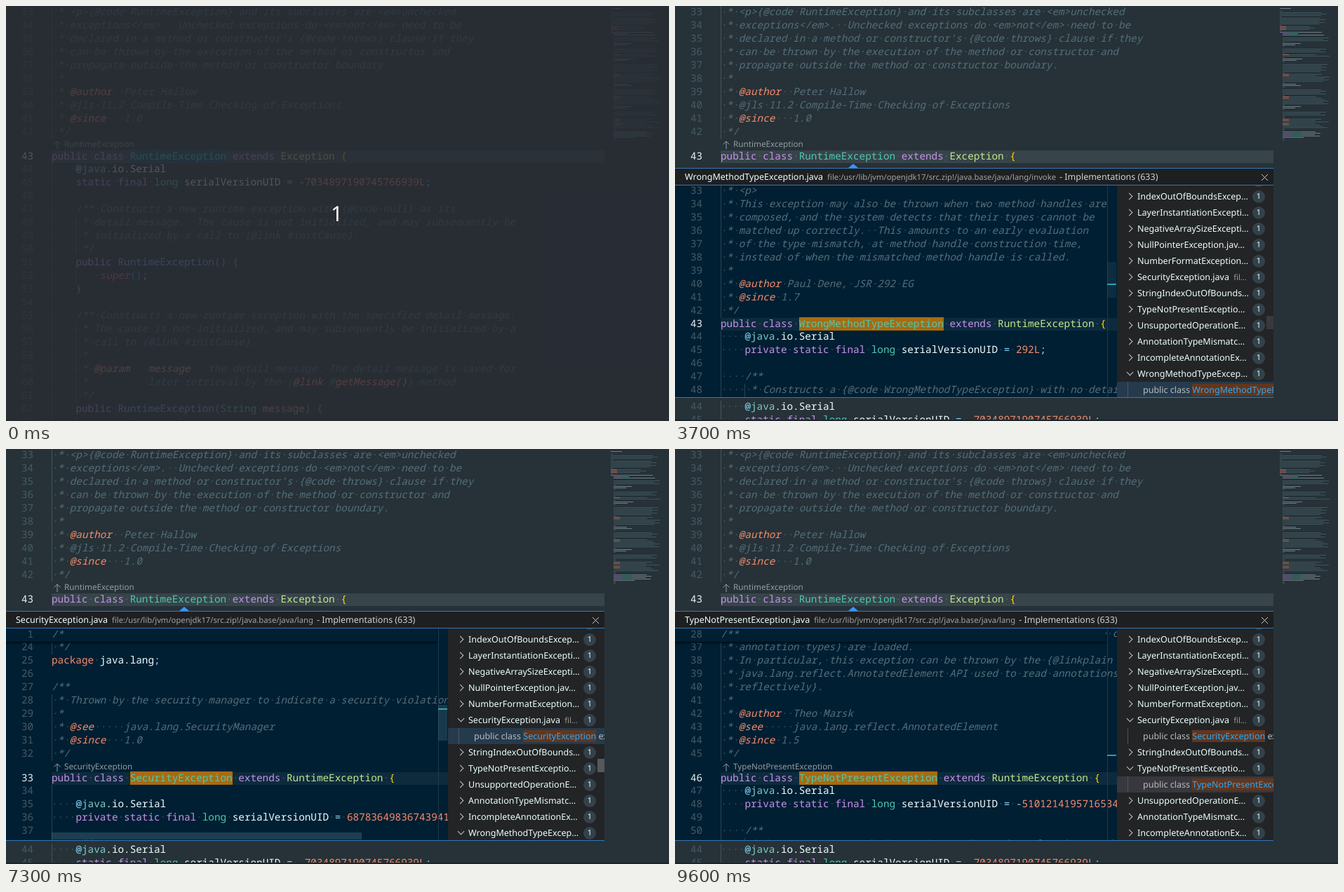
Write an HTML page that moves like this. It is 945 px wide and 592 px high and loops after 9.7 s.

```html
<!DOCTYPE html>
<html lang="en">
<head>
<meta charset="utf-8">
<title>Peek implementations</title>
<style>
html, body { margin: 0; width: 100%; height: 100%; overflow: hidden; background: #263238; }
div, svg { position: absolute; top: 0; left: 0; }
div { white-space: pre; box-sizing: border-box; }
b { font-weight: normal; }
s { text-decoration: none; color: rgba(130, 160, 170, .36); }
#stage { width: 945px; height: 592px; overflow: hidden; background: #263238; color: #eeffff;
  font: 12.5px/23px "Noto Sans", sans-serif; text-rendering: geometricPrecision; }
#main { width: 853px; height: 592px; overflow: hidden; }
#tail { width: 100%; }
.row { width: 100%; height: 18.95px; font: 14.32px/18.95px "Noto Sans Mono", monospace; }
.no { width: 39.2px; text-align: right; color: #465a64; }
.code { left: 65px; }
.on .no { color: #e8f0f0; }
.on::before { content: ""; position: absolute; left: 65px; right: 0; height: 100%; background: #37444a; }
.guide { width: 1px; height: 19px; background: rgba(190, 200, 170, .22); }
.lens { left: 83px; font-size: 11.7px; line-height: 16px; color: #929da1; }
.lens svg { left: -16px; top: 2px; }
em { color: #546e7a; }
.k { color: #c792ea; } .t, .c { color: #4ec9b0; } .i { color: #c3e88d; } .f { color: #82aaff; }
.r { color: #ff5370; font-style: italic; } .n { color: #f78c6c; } .y { color: #89ddff; } .j { color: #80cbc4; }
.d0 .p { color: #ffd700; } .d1 .p { color: #da70d6; } .d2 .p { color: #179fff; }
.hi .c { background: #124c61; }
#caret { left: 253px; top: 206px; width: 2px; height: 18px; background: #3bc9db; }
#mini div { height: 1px; }
#menu { left: 255px; top: 206px; width: 314px; height: 377px; padding: 5px 0; background: #252526; color: #ccc; }
#menu div { position: relative; height: 25px; line-height: 25px; padding: 0 26px; }
#menu div.hot { background: #253a4d; color: #fff; }
#menu span { position: absolute; right: 26px; }
#menu hr { margin: 4px 10px 3.5px; border: 0; border-top: 1px solid #454545; }
#title { top: 231px; width: 853px; height: 25px; padding-left: 14px; line-height: 24px; background: #1e1f21;
  border: solid #3478b8; border-width: 1px 0; }
#title small { font-size: 11.25px; color: #a0a4a8; margin: 0 5px 0 6px; }
#title span { color: #d0d3d5; }
#arrow { left: 247px; top: 225px; border: 7px solid transparent; border-top: 0; border-bottom: 6px solid #3794ff; }
#close { left: 835px; top: 239px; }
#body { top: 256px; width: 630px; height: 302px; overflow: hidden; background: #001f33; }
#body .on::before { background: #0d2b3d; }
#body .c { background: #a66c12; }
#body.raw .code, #body.raw em, #body.raw b { color: #c3cdd2; font-style: normal; }
#body.raw .d0 .p { color: #ffd700; }
#sticky { width: 614px; height: 19px; background: #001f33; box-shadow: 0 2px 3px #000a; }
#ruler { left: 616px; width: 13px; height: 302px; border-left: 1px solid #1b3a4b; }
#tick { left: 616px; width: 13px; height: 2px; background: #25a0b4; }
#vbar { left: 616px; top: 109px; width: 13px; height: 51px; background: rgba(120, 160, 170, .2); }
#hbar { left: 65px; top: 291px; width: 442px; height: 10px; background: rgba(120, 160, 170, .25); }
#list { left: 630px; top: 256px; width: 223px; height: 302px; overflow: hidden; background: #222426; }
.item { width: 100%; height: 23px; padding-left: 29px; }
.item small { font-size: 11.25px; color: #999; }
.item::before { content: ""; position: absolute; left: 14px; top: 8px; width: 6px; height: 6px;
  border: solid #c5c5c5; border-width: 1px 1px 0 0; transform: rotate(45deg); }
.open::before { top: 6px; left: 15px; transform: rotate(135deg); }
.item i { position: absolute; left: 193px; top: 3px; width: 18px; height: 18px; border-radius: 9px;
  background: #33424a; font: 11px/18px "Noto Sans", sans-serif; text-align: center; }
.child { padding-left: 37px; color: #b9bcbe; }
.child::before { left: 15px; top: 0; width: 0; height: 23px; transform: none; border-width: 0 0 0 1px; border-color: #555; }
mark { background: #62361d; color: #2aaaff; }
.sel { background: #253a4d; }
.idle .sel { background: #37373d; }
#lbar { left: 843px; top: 442px; width: 10px; height: 19px; background: rgba(121, 125, 128, .6); }
#edge { top: 558px; width: 853px; height: 1px; background: #3478b8; }
#foot { top: 590px; width: 945px; height: 2px; background: #1c2529; }
#dim { width: 945px; height: 592px; background: rgba(40, 44, 52, .8); }
#dim div { width: 943px; top: 276px; text-align: center; font: 30px/40px "Noto Sans", sans-serif; color: #fff; }
</style>
</head>
<body>
<div id="stage">
  <div id="main"></div>
  <div id="caret"></div>
  <div id="mini"></div>
  <div id="menu"></div>
  <div id="peek">
    <div id="arrow"></div>
    <div id="title"></div>
    <svg id="close" width="11" height="11" stroke="#ccc"><path d="M1 1 10 10M10 1 1 10"/></svg>
    <div id="body"></div>
    <div id="list"></div>
    <div id="lbar"></div>
    <div id="edge"></div>
  </div>
  <div id="foot"></div>
  <div id="dim"><div>1</div></div>
</div>
<script>
const $ = id => document.getElementById(id);
const LOOP = 9700, PITCH = 18.95, LENS = 16;

const MAIN = ` * <p>{@code RuntimeException} and its subclasses are <em>unchecked
 * exceptions</em>.  Unchecked exceptions do <em>not</em> need to be
 * declared in a method or constructor's {@code throws} clause if they
 * can be thrown by the execution of the method or constructor and
 * propagate outside the method or constructor boundary.
 *
 * @author  Peter Hallow
 * @jls 11.2 Compile-Time Checking of Exceptions
 * @since   1.0
 */
public class RuntimeException extends Exception {
    @java.io.Serial
    static final long serialVersionUID = -7034897190745766939L;

    /** Constructs a new runtime exception with {@code null} as its
     * detail message.  The cause is not initialized, and may subsequently be
     * initialized by a call to {@link #initCause}.
     */
    public RuntimeException() {
        super();
    }

    /** Constructs a new runtime exception with the specified detail message.
     * The cause is not initialized, and may subsequently be initialized by a
     * call to {@link #initCause}.
     *
     * @param   message   the detail message. The detail message is saved for
     *          later retrieval by the {@link #getMessage()} method.
     */
    public RuntimeException(String message) {
        super(message);`.split('\n');

const FILES = [
  { name: 'WrongMethodTypeException', dir: '/invoke', start: 3700, first: 33, decl: 43, tick: 397, text: ` * <p>
 * This exception may also be thrown when two method handles are
 * composed, and the system detects that their types cannot be
 * matched up correctly.  This amounts to an early evaluation
 * of the type mismatch, at method handle construction time,
 * instead of when the mismatched method handle is called.
 *
 * @author Paul Dene, JSR 292 EG
 * @since 1.7
 */
public class WrongMethodTypeException extends RuntimeException {
    @java.io.Serial
    private static final long serialVersionUID = 292L;

    /**
     * Constructs a {@code WrongMethodTypeException} with no detail` },
  { name: 'SecurityException', dir: '', start: 6500, first: 23, decl: 33, tick: 369, text: ` *
 */
package java.lang;

/**
 * Thrown by the security manager to indicate a security violation.
 *
 * @see     java.lang.SecurityManager
 * @since   1.0
 */
public class SecurityException extends RuntimeException {

    @java.io.Serial
    private static final long serialVersionUID = 6878364983674394167L;

    /**` },
  { name: 'TypeNotPresentException', dir: '', start: 8400, first: 36, decl: 46, tick: 435, text:
` * <p>Note that this exception may be thrown when some types are c
 * annotation types) are loaded.
 * In particular, this exception can be thrown by the {@linkplain
 * java.lang.reflect.AnnotatedElement API used to read annotations
 * reflectively}.
 *
 * @author  Theo Marsk
 * @see     java.lang.reflect.AnnotatedElement
 * @since 1.5
 */
public class TypeNotPresentException extends RuntimeException {
    @java.io.Serial
    private static final long serialVersionUID = -5101214195716534496L;

    /**
     * Constructs a {@code TypeNotPresentException} for the named type` }
];

// Syntax colouring: each named group is the class of its token.
const CODE = /(?<k>\b(?:public|class|static|final|private|extends)\b)|(?<t>\b(?:long|String)\b)|(?<c>(?<=class )\w+)|(?<i>(?<=extends )\w+)|(?<r>\bsuper\b)|(?<f>\w+(?=\())|(?<n>\b(?:\d+L|package|message)\b)|(?<j>(?<=@)java)|(?<y>[@;=-])|(?<p>[(){}])/g;
const DOC = /(?<n>@(?:author|since|see)\b|@param +message|@link(?= #get)|getMessage\(\))/g;

const plain = s => s.replace(/[&<>]/g, c => `&#${c.charCodeAt()};`).replace(/ /g, '<s>·</s>');

function mark(text, pattern) {
  let out = '', at = 0;
  for (const m of text.matchAll(pattern)) {
    const kind = Object.keys(m.groups).find(k => m.groups[k] !== undefined);
    out += plain(text.slice(at, m.index)) + `<b class="${kind}">${plain(m[0])}</b>`;
    at = m.index + m[0].length;
  }
  return out + plain(text.slice(at));
}

const paint = src => /^\s*(\/\*|\*)/.test(src) ? `<em>${mark(src, DOC)}</em>` : mark(src, CODE);

function row(no, src, top, decl) {
  const lead = src.search(/\S|$/);
  const guides = [65, 99].slice(0, lead > 4 ? 2 : lead || (!src && no > decl) ? 1 : 0);
  return `<div class="row d${lead >> 2} ${no === decl ? 'on' : ''}" style="top:${top}px">` +
    guides.map(x => `<div class="guide" style="left:${x}px"></div>`).join('') +
    `<div class="no">${no}</div><div class="code">${paint(src)}</div></div>`;
}

const lens = (name, top) => `<div class="lens" style="top:${top}px"><svg width="12" height="13" fill="none"
  stroke="#929da1"><path d="M6 13V2M1.5 6.5 6 2l4.5 4.5"/></svg>${name}</div>`;

function buildMain() {
  const rows = MAIN.map((src, i) => row(33 + i, src, i * PITCH + (i > 9 ? LENS : 0), 43));
  $('main').innerHTML = rows.slice(0, 11).join('') + lens('RuntimeException', 189) +
    `<div id="tail">${rows.slice(11).join('')}</div>`;
}

// One letter per line: s short, c comment, o doc tag, k/K code.
function buildMini() {
  const kinds = 'k scccscccccsooosKkK cccskks cccsocskks ccccccsooccccskks ccccsooccccskks cccssoocooccssKKKKkss';
  const size = { s: 3, c: 54, o: 42, k: 16, K: 46 };
  $('mini').innerHTML = [...kinds].map((kind, i) => {
    if (kind === ' ') return '';
    const width = size[kind] + (kind === 's' ? 0 : i * 37 % 15);
    const ink = /[kK]/.test(kind) ? '#9aa9b5a0' : '#546e7a90';
    const head = kind === 'o' ? '#f78c6ca0 0 9px,' : kind === 'K' ? '#c792ea90 0 12px,#4ec9b090 12px 26px,' : '';
    return `<div style="left:${862 + (i > 17 ? 4 : 0)}px;top:${3 + 2 * i}px;width:${width}px;` +
      `background:linear-gradient(90deg,${head}${ink} 0 100%)"></div>`;
  }).join('');
}

const MENU = ['Go to Definition|F12', 'Go to Type Definition', 'Go to Implementations|Ctrl+F12',
  'Go to References|Shift+F12', 'Peek|›', '', 'Find All References|Shift+Alt+F12', 'Find All Implementations',
  'Show Call Hierarchy|Shift+Alt+H', 'Show Type Hierarchy', '', 'Rename Symbol|F2',
  'Change All Occurrences|Ctrl+F2', 'Format Document|Ctrl+Shift+I', 'Refactor...|Ctrl+Shift+R', 'Source Action...'];

function buildMenu(hot) {
  $('menu').innerHTML = MENU.map((item, i) => {
    const [label, key = ''] = item.split('|');
    return item ? `<div class="${i === hot ? 'hot' : ''}">${label}<span>${key}</span></div>` : '<hr>';
  }).join('');
}

function buildBody(file, age, sticky) {
  const shown = age >= 300;
  const y = i => i * PITCH - 1;
  $('body').className = file.start > 3700 && age < 100 ? 'raw' : '';
  $('body').innerHTML = file.text.split('\n').map((src, i) =>
    row(file.first + i, src, y(i) + (shown && i > 9 ? LENS : 0), file.decl)).join('') +
    (shown ? lens(file.name, y(10)) : '') +
    (sticky ? `<div id="sticky">${row(sticky, sticky === 1 ? '/*' : '/**', -.5)}</div>` : '') +
    `<div id="ruler"></div><div id="tick" style="top:${file.tick - 257 + (shown ? 1.5 : 0)}px"></div>
    <div id="vbar"></div><div id="hbar"></div>`;
  $('title').innerHTML = `${file.name}.java<small>file:/usr/lib/jvm/openjdk17/src.zip!/java.base/java/lang${file.dir}</small>` +
    '<span>- Implementations (633)</span>';
}

const ITEMS = ['IllegalThreadStateExc…', 'IndexOutOfBoundsExcep…', 'LayerInstantiationExcepti…', 'NegativeArraySizeExcepti…',
  'NullPointerException.jav…', 'NumberFormatException…', 'SecurityException.java <small> fil…</small>',
  'StringIndexOutOfBounds…', 'TypeNotPresentExceptio…', 'UnsupportedOperationE…', 'AnnotationTypeMismatc…',
  'IncompleteAnnotationEx…', 'WrongMethodTypeExcep…'];

function buildList(open, selected) {
  const rows = [];
  const add = (key, cls, html) => rows.push(`<div class="item ${cls} ${key === selected ? 'sel' : ''}"
    style="top:${rows.length * 23 - 19}px">${html}</div>`);
  ITEMS.forEach(label => {
    const file = open.find(f => label.startsWith(f.name.slice(0, 12)));
    const key = label.slice(0, 4);
    add(key, file ? 'open' : '', `${label}<i>1</i>`);
    if (file) add(key + '+', 'child', `public class <mark>${file.name}</mark> extends RuntimeException`);
  });
  $('list').innerHTML = rows.join('');
}

// Last value whose start time has been reached.
const at = (t, ...steps) => steps.filter(([from]) => t >= from).pop()[1];
const fade = (t, from) => t < from ? 0 : Math.max(0, 1 - (t - from) / 800);
const show = (id, on) => $(id).style.display = on ? '' : 'none';

const drawn = {};
function update(build, ...args) {
  const key = JSON.stringify(args);
  if (drawn[build.name] !== key) build(...args);
  drawn[build.name] = key;
}

function frame() {
  const t = Math.floor(performance.now() % LOOP / 100) * 100;
  const peek = t >= 3700, menu = t >= 800 && t < 1900;
  show('dim', t < 100);
  show('menu', menu);
  show('caret', t >= 100 && !peek && !menu);
  show('peek', peek);
  $('main').className = peek ? '' : 'hi';
  $('tail').style.top = peek ? '339px' : 0;
  if (menu) update(buildMenu, at(t, [0, -1], [1200, 1], [1500, 2]));
  if (peek) {
    const file = FILES.filter(f => t >= f.start).pop();
    const age = Math.min(t - file.start, 300);
    update(buildBody, file, age, at(t, [0, 0], [4600, 28], [7300, 1], [9300, 28]));
    const open = FILES.filter((f, i) => t >= [0, 5700, 8100][i]);
    update(buildList, open, at(t, [0, 'Wron+'], [5600, 'Secu'], [6500, 'Secu+'], [8000, 'Type'], [8400, 'Type+']));
    $('list').className = t >= 9400 ? 'idle' : '';
    const bars = fade(t, 4600) + fade(t, 7300) + fade(t, 8500);
    $('hbar').style.opacity = bars;
    $('vbar').style.opacity = t < 4000 ? .5 : bars;
    $('lbar').style.opacity = t < 8800 ? at(t, [0, .4], [4200, .2], [4400, 0], [4600, .5], [4700, 1]) : fade(t, 8800);
  }
  requestAnimationFrame(frame);
}

buildMain();
buildMini();
frame();
</script>
</body>
</html>
```
